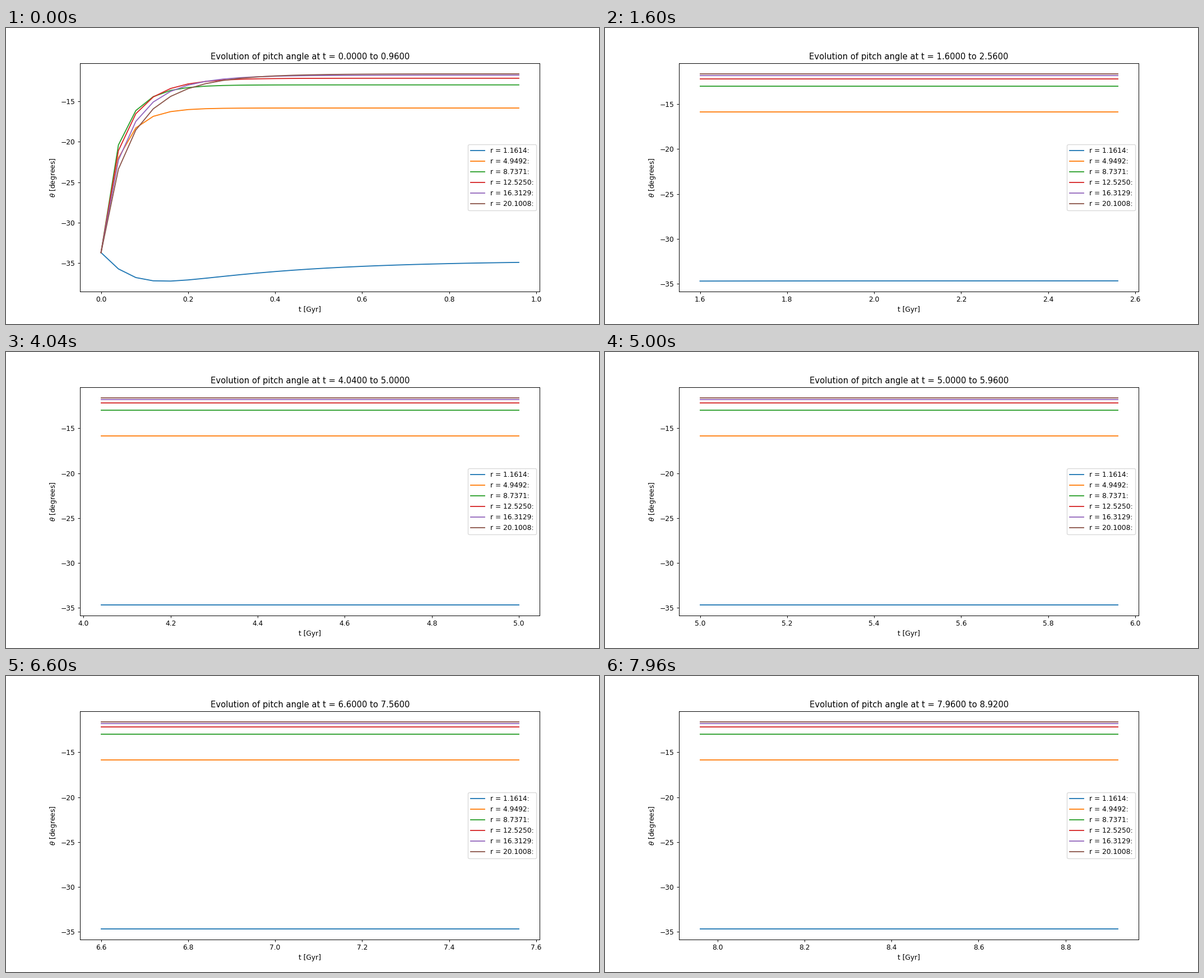
A matplotlib script for the animation above (8000 ms loop, 1058 by 529 pixels).

```python
import numpy as np
import matplotlib.pyplot as plt
from matplotlib.animation import FuncAnimation

WIDTH, HEIGHT = 1058, 529
INCHES = 12
FRAMES = 200
WINDOW = 25
STEP = 0.04
START = -2 / 3      # tangent of the common starting angle
SLOW_RATE = 3.3

times = np.arange(FRAMES + WINDOW) * STEP
radii = np.linspace(1.16136, 20.10076, 6)

# settled angle, growth rate, shape and share of the slow mode, per radius
MODES = [
    (-34.685, 18.9, 0.48, -0.133),
    (-15.83, 20.7, -0.41, 0),
    (-12.97, 18.1, -0.49, 0),
    (-12.15, 14.0, -0.545, 0),
    (-11.78, 11.4, -0.55, 0),
    (-11.61, 9.55, -0.55, 0),
]


def pitch_angle(settled, rate, shape, slow):
    """Ratio of two field components as it relaxes to its settled value."""
    end = np.tan(np.radians(settled))
    fast = (START - end - slow) * (1 + shape) / (np.exp(rate * times) + shape)
    return np.degrees(np.arctan(end + fast + slow * np.exp(-SLOW_RATE * times)))


def padded(low, high, margin=0.05):
    pad = (high - low) * margin
    return low - pad, high + pad


angles = np.array([pitch_angle(*mode) for mode in MODES])

fig, ax = plt.subplots(figsize=(INCHES, INCHES * HEIGHT / WIDTH),
                       dpi=WIDTH / INCHES)
lines = [ax.plot([], [], label=f"r = {r:.4f}:")[0] for r in radii]
ax.set_xlabel("t [Gyr]")
ax.set_ylabel(r"$\theta$ [degrees]")
ax.legend(loc="center right")
title = ax.set_title("")


def update(frame):
    span = slice(frame, frame + WINDOW)
    t, view = times[span], angles[:, span]
    for line, values in zip(lines, view):
        line.set_data(t, values)
    ax.set_xlim(*padded(t[0], t[-1]))
    ax.set_ylim(*padded(view.min(), view.max()))
    title.set_text(f"Evolution of pitch angle at t = {t[0]:.4f} to {t[-1]:.4f}")
    return [*lines, title]


anim = FuncAnimation(fig, update, frames=FRAMES, interval=40,
                     init_func=lambda: update(0), repeat=True, repeat_delay=0)
plt.show()
```
